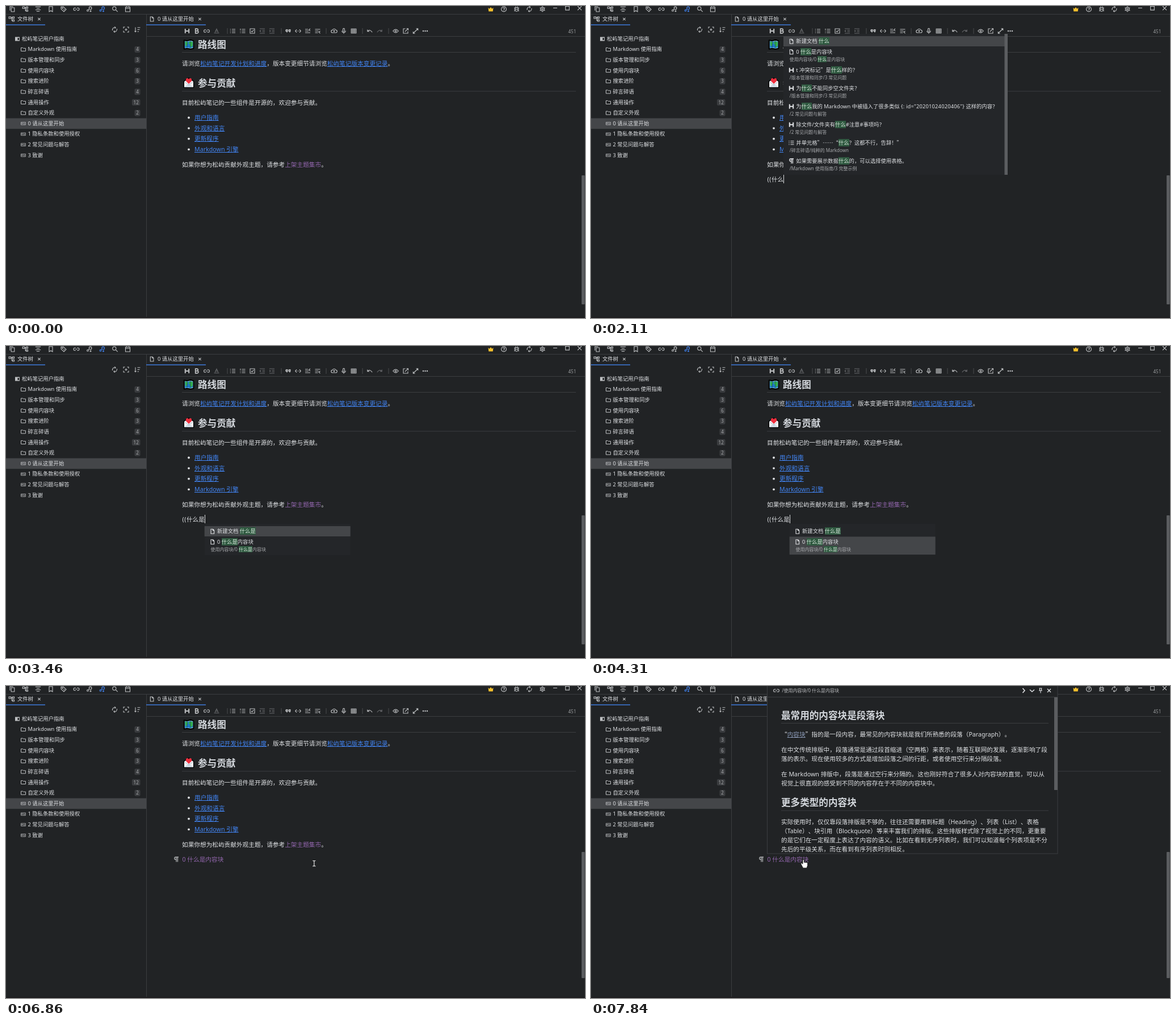
Recreate the animation shown at these times as an HTML page. Size 1020 by 549 pixels, loop 8 s.

```html
<!DOCTYPE html>
<html lang="zh-CN">
<head>
<meta charset="utf-8">
<title>内容块引用</title>
<style>
html, body { margin: 0; width: 100%; height: 100%; overflow: hidden; background: #212325; }
body, div, svg.layer { position: absolute; left: 0; top: 0; width: 1020px; height: 549px; overflow: hidden; }
body { font-family: "Noto Sans", "Noto Sans CJK SC", "Noto Sans CJK", sans-serif; text-spacing-trim: space-all; }
p { position: absolute; margin: 0; line-height: 20px; white-space: pre; }
p.block { line-height: 16px; }
i { font-style: normal; font-family: "Noto Sans CJK SC", "Noto Sans CJK", sans-serif; line-height: 0; }
u { color: #4285f4; }
mark { background: #2f5940; color: #dbeade; }
s { position: absolute; top: 2px; width: 1px; height: 15px; background: #dcdee0; }
.paren { letter-spacing: .5px; }
.code { letter-spacing: .18px; }
.bulb { width: 1em; height: 1.15em; vertical-align: -.2em; }
</style>
</head>
<body>
<div id="base"></div>
<div id="live"></div>
<script>
const BG = "#212325", MENU = "#242629", LINE = "#3b3d40", SELECTED = "#444649", THUMB = "#5b5d60";
const TEXT = "#dfe1e4", ICON = "#bfc1c3", DIM = "#696b6e", BLUE = "#4285f4", PURPLE = "#9266ad", ORANGE = "#ffc567";
const SMALL = 8, UI = 9.33, BODY = 10.67, HEAD = 16.6;
const DURATION = 8000;

const ring = (x, y, r) => `M${x - r} ${y}a${r} ${r} 0 1 0 ${2 * r} 0a${r} ${r} 0 1 0 ${-2 * r} 0`;
const lines = (...ys) => ys.map(y => `M-1.5 ${y}h6M-4.7 ${y}h1.3`).join("");
const nodes = ring(1.6, -1.8, 2.3) + ring(-3, 2.4, 1.4) + ring(2, 3.5, .9) + "M-2 1.4l1.9-1.7";
const sync = "M-3.8 1.5a4 4 0 0 1 5.2-5M-.2-5l1.8 1.5-1.5 1.6M3.8-1.5a4 4 0 0 1-5.2 5M.2 5l-1.8-1.5 1.5-1.6";
const ICONS = {
  copy: "M-1.8-2.5h5.6v7h-5.6zM-4 2.5v-7h5.5",
  tree: "M-4.8-4h3.5v3h-3.5zM1.5-4h3v2.6h-3zM1.5 1.4h3V4h-3zM-1.3-2.7h2.8M.2-2.7v5.4h1.3",
  outline: "M-4.7-4h9.4M-2.7-1.3h5.4M-4.7 1.3h9.4M-2.7 4h5.4",
  bookmark: "M-3-4.5h6v9l-3-1.8-3 1.8z",
  tag: "M-4.5-4h4.3l4.7 4.5-4 4-5-4.7z" + ring(-2, -1.8, .7) + "M0 0l1.5 1.5",
  link: "M-1-2.3h-1.6a2.3 2.3 0 0 0 0 4.6h1.6M1-2.3h1.6a2.3 2.3 0 0 1 0 4.6H1M-1.7 0h3.4",
  nodes,
  search: ring(-1.2, -1.2, 3.1) + "M1.2 1.2l3.5 3.5",
  calendar: "M-4-3.5h8v8h-8zM-4-1.3h8M-2-5v2M2-5v2",
  help: ring(0, 0, 4.5) + "M-1.5-1a1.5 1.5 0 1 1 2.2 1.3Q0 .6 0 1.4M0 2.2v1",
  bug: "M-2.5-2.5h5v5q-2.5 3-5 0zM-4.5-2h2M2.5-2h2M-4.5 .5h9M-4.5 3h2M2.5 3h2M-2-4.5l1 1.5M2-4.5l-1 1.5",
  sync,
  gear: ring(0, 0, 3.4) + ring(0, 0, 1.3) + "M0-5v1.5M0 3.5V5M-4.5-2.5l1.3.8M3.2 1.7l1.3.8M4.5-2.5l-1.3.8M-3.2 1.7l-1.3.8",
  minimise: "M-3.5-2h7", maximise: "M-3.3-5h6.6v6.6h-6.6z", close: "M-3.5-5.2l7 7M3.5-5.2l-7 7", cross: "M-2.2-2.2l4.4 4.4M2.2-2.2l-4.4 4.4",
  focus: "M-4.5-2v-2.5H-2M2-4.5h2.5V-2M4.5 2v2.5H2M-2 4.5h-2.5V2" + ring(0, 0, 1.3),
  sort: "M-3.5-4v8M-5 2.5l1.5 1.7L-2 2.5M0-3.5h5M0 0h4M0 3.5h2.5",
  folder: "M-4-3h3l1 1h4v5h-8z",
  markdown: "M-4-2.3h8v4.6h-8zM-2.6 1v-2l1 1 1-1v2M1.8-1v2M.8 .2l1 .9 1-.9",
  doc: "M-2.7-4h3.6l2 2v6h-5.6zM.7-4v2.2h2.2",
  H: "M-3.2-4v8M3.2-4v8M-3.2 0h6.4", B: "M-2.3-3.8h2.7a1.8 1.8 0 0 1 0 3.7h-2.7zM-2.3-.1h3.2a1.9 1.9 0 0 1 0 3.9h-3.2z",
  A: "M-2.8 2.2l2.8-6 2.8 6M-1.8 .2h3.6",
  list: lines(-3, 0, 3), ordered: lines(-3, 0, 3) + "M-4-4v2",
  check: "M-4-4h8v8h-8zM-2 0l1.5 1.6L2.5-2",
  outdent: "M-4.5-4h9M0-1.3h4.5M0 1.3h4.5M-4.5 4h9M-2.5-1.5L-4.3 0l1.8 1.5",
  indent: "M-4.5-4h9M0-1.3h4.5M0 1.3h4.5M-4.5 4h9M-4.3-1.5L-2.5 0l-1.8 1.5",
  quote: "M-3.8-2.2h2.5v2.5l-1.3 2M-3.8-2.2v2.5h2.5M1.2-2.2h2.5v2.5l-1.3 2M1.2-2.2v2.5h2.5",
  code: "M-2.4-2.5L-4.8 0l2.4 2.5M2.4-2.5L4.8 0 2.4 2.5M-.9 0h1.8",
  before: "M-4.5-3h5M-4.5 0h6M-4.5 3h9M4.5-4L2-2l2.5 2", after: "M-4.5-3h9M-4.5 0h6M-4.5 3h5M4.5 0L2 2l2.5 2",
  upload: "M-2.7 3a2.3 2.3 0 0 1-.3-4.6 3.3 3.3 0 0 1 6.2 0A2.3 2.3 0 0 1 2.8 3zM0 2v-3M-1.3 .2L0-1.2 1.3 .2",
  mic: "M-1.4-3.2a1.4 1.4 0 0 1 2.8 0v3a1.4 1.4 0 0 1-2.8 0zM-3.2-.5a3.2 3.2 0 0 0 6.4 0M0 2.7v2",
  table: "M-4.3-3.7h8.6v7.4h-8.6zM-4.3-1.3h8.6M-4.3 1.2h8.6M-1.4-3.7v7.4M1.4-3.7v7.4",
  undo: "M-4.2-2.5v3.2h3.2M-4 .5q4-4.5 8.2 1.8", redo: "M4.2-2.5v3.2H1M4 .5q-4-4.5-8.2 1.8",
  eye: "M-4.8 0q4.8-6 9.6 0q-4.8 6-9.6 0z" + ring(0, 0, 1.3),
  exportOut: "M-.5-4h-3.5v8h8V.5M1.5-4.3h3v3M4.3-4.2L-1 1",
  expand: "M1-4.2h3.2V-1M-1 4.2h-3.2V1M4-4l-8 8",
  more: ring(-3.5, 0, .7) + ring(0, 0, .7) + ring(3.5, 0, .7),
  pilcrow: "M4-4h-5a2.2 2.2 0 0 0 0 4.4h1M0-4v8.4M2.4-4v8.4",
  right: "M-1.5-4l3.5 4-3.5 4", down: "M-4-1.5l4 3.5 4-3.5", pin: "M-2.5-4h5M-1.5-4v4M1.5-4v4M-3 0h6M0 0v4.5"
};
const WEIGHTS = { H: 2, B: 1.7, right: 1.6, down: 1.6, pilcrow: 1.4, quote: 1.5, markdown: .8, folder: 1 };

const svg = markup => `<svg class="layer">${markup}</svg>`;
const rect = (x, y, w, h, fill, extra = "") => `<rect x="${x}" y="${y}" width="${w}" height="${h}" fill="${fill}" ${extra}/>`;
const shape = (d, fill, extra = "") => `<path d="${d}" fill="${fill}" ${extra}/>`;
const at = (x, y, markup) => `<g transform="translate(${x} ${y})">${markup}</g>`;
const icon = (name, x, y, color = ICON) =>
  at(x, y, shape(ICONS[name], "none", `stroke="${color}" stroke-width="${WEIGHTS[name] || 1.1}"`));
const iconRow = (y, names, xs, color) => names.split(" ").map((name, i) => icon(name, xs[i], y, color)).join("");
// Curly quotes and ellipses are full width, as in Chinese type.
const wide = html => html.replace(/[“”…]+/g, "<i>$&</i>");
const text = (x, y, size, html, color = TEXT, style = "") =>
  `<p style="left:${x}px;top:${y - 10}px;font-size:${size}px;color:${color};${style}">${wide(html)}</p>`;
const heading = (x, y, html) => text(x, y, HEAD, html, "#d3d7dc", "font-weight:700");
const paragraph = (x, y, rows) =>
  `<p class="block" style="left:${x}px;top:${y - 8}px;font-size:${BODY}px;color:${TEXT}">${wide(rows.join("<br>"))}</p>`;

const MAP = shape("M-8.2-7.2l5.2 1 6-1.5 5.4 1.5v13.4l-5.4 1-6-1-5.2 1z", "#a5e3f2", 'stroke="#000" stroke-width="2" stroke-linejoin="round"') +
  shape("M-6.8-5.4l4.3 1 5-1.3 4.6 1v10.3l-4.6 1-5-1-4.3 1z", "#1f78c4") +
  shape("M-6.5-5l4 .8 1.5 2-2 2.5-1 4-2-3zM1-5.2l5.8 1v6l-2.8 4-2-5-2-2z", "#35b24a") +
  shape("M-2.7-6v12M2.8-6.5v12.5", "none", 'stroke="#123f68" stroke-width=".7"');
const LETTER = shape("M-8.5-2.5L0-8.3l8.5 5.8v10.8h-17z", "#000", 'stroke="#000" stroke-width="1.6" stroke-linejoin="round"') +
  shape("M-8-2.2L-4-4.5h8l4 2.3v10h-16z", "#f2f4f6") +
  shape("M-8 7.8l8-6 8 6z", "#cfdbe6") +
  shape("M-8-2L0 4l8-6", "none", 'stroke="#9fb0bf" stroke-width=".8"') +
  shape("M0 2l-5-5q-1-4.6 2.4-5Q-.6-8 0-6q.6-2 2.6-2 3.4.4 2.4 5z", "#ee2f3e");
const BULB = `<svg class="bulb" viewBox="-5 -6 10 12"><circle cy="-2" r="3.7" fill="#ffcd38"/><path d="M-1.6 1.3h3.2v3.6h-3.2z" fill="#b6a77a"/></svg>`;

function sidebar() {
  const folders = [["Markdown 使用指南", 4], ["版本管理和同步", 3], ["使用内容块", 6], ["搜索进阶", 3], ["碎言碎语", 4], ["通用操作", 12], ["自定义外观", 2]];
  const pages = ["0 请从这里开始", "1 隐私条款和使用授权", "2 常见问题与解答", "3 致谢"];
  let shapes = rect(0, 197.5, 247, 18.7, SELECTED), words = text(28, 58, UI, "松屿笔记用户指南");
  [...folders, ...pages].forEach((entry, i) => {
    const y = 76.4 + i * 18.63, [name, count] = Array.isArray(entry) ? entry : [entry];
    shapes += icon(count ? "folder" : "markdown", 30.5, y);
    words += text(38.5, y, UI, name);
    if (count) {
      const w = count > 9 ? 14.6 : 10;
      shapes += rect(236.5 - w, y - 5.5, w, 11, "#3a3c3f", 'rx="2"');
      words += text(239.2 - w, y, SMALL, String(count), "#a5a7a9");
    }
  });
  shapes += shape("M16 54.5h8v7h-8z", ICON) + shape("M20.5 56h2.5v4h-2.5z", BG);
  return svg(shapes) + words;
}

function chrome() {
  const separators = [389.5, 484.5, 563.5, 627.5, 673.5].map(x => rect(x, 39, 1, 10, "#4a4c4f")).join("");
  return svg(
    rect(0, 14, 1020, 1, LINE) + rect(247, 14, 1, 533, LINE) + rect(248, 53, 772, 1, LINE) + rect(0, 547, 1020, 2, "#1c1b1d") +
    rect(0, 32.5, 69, 1.3, BLUE) + rect(247, 32.5, 105, 1.3, BLUE) +
    iconRow(5.5, "copy tree outline bookmark tag link nodes", [11, 34, 56.5, 79, 101.5, 124, 147]) +
    icon("nodes", 169.5, 5.5, BLUE) + iconRow(5.5, "search calendar", [192, 214.5]) +
    at(854, 6, shape("M-4.5-3l2.3 2L0-4l2.2 3 2.3-2-.8 6.5h-7.4z", "#f6c12d")) +
    iconRow(5.5, "help bug sync gear minimise maximise close", [877, 899.5, 922, 945, 967.5, 989, 1010.5]) +
    iconRow(23, "tree cross doc cross", [10, 58.5, 257, 341.5]) +
    iconRow(41.5, "sync focus sort", [191.5, 211.5, 231.5]) +
    iconRow(44, "H B link list ordered check quote code before after upload mic table undo eye exportOut expand more",
      [319, 336, 353.5, 399.5, 417, 434, 497, 514.5, 531.5, 549, 578, 595, 612.5, 641, 686.5, 704, 721.5, 738.5]) +
    iconRow(44, "outdent indent redo", [451.5, 468.5, 658], DIM) + separators
  ) + text(20, 23, UI, "文件树") + text(267, 23, UI, "0 请从这里开始") + text(990.5, 44.5, SMALL, "451", "#999b9d");
}

function article() {
  const links = ["用户指南", "外观和语言", "更新程序", "Markdown 引擎"];
  return svg(
    at(322, 67.5, MAP) + at(322, 135, LETTER) + rect(310, 81, 694, 1, LINE) + rect(310, 149.5, 694, 1, LINE) +
    links.map((_, i) => `<circle cx="322" cy="${196.5 + i * 18.6}" r="1.9" fill="${TEXT}"/>`).join("")
  ) + heading(338, 67.5, "路线图") + heading(338, 135.5, "参与贡献") +
    text(310, 101, BODY, "请浏览<u>松屿笔记开发计划和进度</u>，版本变更细节请浏览<u>松屿笔记版本变更记录</u>。") +
    text(310, 169.5, BODY, "目前松屿笔记的一些组件是开源的，欢迎参与贡献。") +
    links.map((name, i) => text(332, 196 + i * 18.6, BODY, `<u>${name}</u>`)).join("") +
    text(310, 279, BODY, `如果你想为松屿贡献外观主题，请参考<span style="color:${PURPLE}">上架主题集市</span>。`);
}

function menu({ x, y, w, h, bar = 0, items }, selected = 0) {
  let shapes = rect(x, y, w, h, MENU), words = "", top = y + 4;
  items.forEach(([kind, title, path], i) => {
    const rowHeight = path ? 32 : 18.5;
    if (i === selected) shapes += rect(x, top, w, rowHeight - .5, SELECTED);
    shapes += icon(kind, x + 14, top + 9.3, TEXT);
    words += text(x + 22.3, top + 9.3, UI, title);
    if (path) words += text(x + 10.7, top + 22.3, SMALL, path, "#a8aaad");
    top += rowHeight;
  });
  if (bar) shapes += rect(x + w - 5.5, y, 5.5, bar, THUMB);
  return `<div style="clip-path:inset(0 0 ${549 - y - h}px 0)">${svg(shapes)}${words}</div>`;
}
const hit = "<mark>什么</mark>";
const recentMenu = menu({ x: 318, y: 49, w: 256, h: 248, bar: 60, items: [
  ["doc", "抽象泄露和奥康的剃刀", "/碎言碎语/抽象泄露和奥康的剃刀"],
  ["doc", "0 什么是内容块", "/使用内容块/0 什么是内容块"],
  ["doc", BULB + " 缘起", `/碎言碎语/${BULB} 缘起`],
  ["doc", "纯粹的 Markdown", "/碎言碎语/纯粹的 Markdown"],
  ["doc", "1 本地仓库", "/版本管理和同步/1 本地仓库"],
  ["doc", "1 隐私条款和使用授权", "/1 隐私条款和使用授权"],
  ["doc", "2 云端同步", "/版本管理和同步/2 云端同步"],
  ["doc", "0 语法速查手册", "/Markdown 使用指南/0 语法速查手册"]] });
const searchMenu = menu({ x: 339, y: 49, w: 395, h: 248, bar: 248, items: [
  ["doc", `新建文档 ${hit}`],
  ["doc", `0 ${hit}是内容块`, `使用内容块/0 ${hit}是内容块`],
  ["H", `t 冲突标记”是${hit}样的？`, "/版本管理和同步/3 常见问题"],
  ["H", `为${hit}不能同步空文件夹？`, "/版本管理和同步/3 常见问题"],
  ["H", `为${hit}我的 Markdown 中被插入了很多类似 <span class="code">{: id="20201024020406"}</span> 这样的内容？`, "/2 常见问题与解答"],
  ["H", `除文件/文件夹有${hit}#注意#事项吗？`, "/2 常见问题与解答"],
  ["list", `并单元格”……“${hit}？这都不行，告辞！”`, "/碎言碎语/纯粹的 Markdown"],
  ["pilcrow", `如果需要展示数据${hit}的，可以选择使用表格。`, "/Markdown 使用指南/3 完整示例"]] });
const fullHit = "<mark>什么是</mark>";
const finalMenu = selected => menu({ x: 349.7, y: 313, w: 257, h: 55, items: [
  ["doc", `新建文档 ${fullHit}`],
  ["doc", `0 ${fullHit}内容块`, `使用内容块/0 ${fullHit}内容块`]] }, selected);

function candidates(x, words) {
  let left = x + 10, html = "";
  words.split(" ").forEach((word, i) => {
    html += text(left, 326, BODY, `${i + 1}.${word}`, i ? "#555" : "#2f8fe6", "font-weight:300");
    left += 17.3 + BODY * word.length;
  });
  const w = left - x + 20;
  return svg(rect(x + .5, 314.5, w - 1, 23, "#fdfdfd", 'stroke="#8db4cf"') +
    shape(`M${left + 2} 323.5v5l-3-2.5z`, "#c3c7cb") + shape(`M${left + 8} 323v6l3.5-3z`, "#2f8fe6")) + html;
}

const preview = svg(
  rect(310.5, -2, 511.5, 297, BG, `stroke="${LINE}"`) + rect(311, 19, 511, 1, LINE) +
  rect(335, 65, 471, 1, LINE) + rect(335, 218.7, 471, 1, LINE) + rect(816, 20, 6, 163, THUMB) +
  icon("link", 326.5, 8) + iconRow(8, "right down pin", [762, 777, 792], TEXT) +
  at(807, 8, shape("M-3-3l6 6M3-3l-6 6", "none", `stroke="${TEXT}" stroke-width="1.4"`))
) + text(336.5, 8, SMALL, "/使用内容块/0 什么是内容块", "#b9bbbe") +
  heading(335, 52, "最常用的内容块是段落块") + heading(335, 205, "更多类型的内容块") +
  paragraph(335, 85, ['“<u style="color:#8c9bb8">内容块</u>”指的是一段内容，最常见的内容块就是我们所熟悉的段落（Paragraph）。']) +
  paragraph(335, 112, ["在中文传统排版中，段落通常是通过段首缩进（空两格）来表示，随着互联网的发展，逐渐影响了段",
    "落的表示。现在使用较多的方式是增加段落之间的行距，或者使用空行来分隔段落。"]) +
  paragraph(335, 154.5, ["在 Markdown 排版中，段落是通过空行来分隔的。这也刚好符合了很多人对内容块的直觉，可以从",
    "视觉上很直观的感受到不同的内容存在于不同的内容块中。"]) +
  paragraph(335, 239, ["实际使用时，仅仅靠段落排版是不够的，往往还需要用到标题（Heading）、列表（List）、表格",
    "（Table）、块引用（Blockquote）等来丰富我们的排版。这些排版样式除了视觉上的不同，更重要",
    "的是它们在一定程度上表达了内容的语义。比如在看到无序列表时，我们可以知道每个列表项是不分",
    "先后的平级关系，而在看到有序列表时则相反。"]);

// Start time, typed text after the brackets, input method candidates.
const TYPING = [
  [710, ""], [1160, "s", "是 上 时候 说 三"], [1270, "sh", "是 上 时候 说 事"], [1390, "she", "社 设 射 蛇 舍"],
  [1500, "shen", "慎 深 神 身 参"], [1710, "shen'm", "什么 神秘 生命 声明 甚"], [1780, "shen'me", "什么 甚么 神么 深 什"],
  [1850, "什么"], [2420, "什么s"], [2480, "什么s", "是 上 说 时 三"], [2630, "什么sh", "是 上 时候 说 事"],
  [2690, "什么shi", "是 事 时 十 使"], [3220, "什么是"]
];
const within = (t, from, to) => t >= from && t < to;
const caret = (opacity = 1) => `<s style="opacity:${opacity}"></s>`;
const OPEN = '<span class="paren">((</span>';

function editorLine(t) {
  const line = html => text(310.5, 305, BODY, html);
  if (t < 500) return "";
  if (t < 710) return line("(" + caret());
  if (t < 4580) {
    const [, typed, words] = TYPING.filter(([start]) => t >= start).pop();
    const blink = within(t, 3770, 3820) ? .5 : within(t, 3820, 4310) ? 0 : 1;
    return line(OPEN + typed + caret(blink)) + (words ? candidates(typed.startsWith("什么") ? 340 : 319, words) : "");
  }
  if (t < 5780) {
    const selection = t < 5230 ? "#2d4f78" : "none";
    const brackets = s => `<span class="paren" style="color:#5d7d5c">${s}</span>`;
    return line(`${brackets("((")}<span style="color:${ORANGE}"><span class="code">20200813004931-q4cu8na</span> ` +
      `"<span style="color:${PURPLE};background:${selection}">{{.text}}</span>"</span>${brackets("))")}` + (t < 5230 ? "" : caret()));
  }
  const blink = t < 6310 || within(t, 6900, 7660) ? 1 : t < 6370 ? .5 : 0;
  return text(310.5, 305, BODY, "0 什么是内容块", PURPLE) + text(310.5, 331, BODY, caret(blink));
}

function pointer(t) {
  if (t < 6520) return "";
  const left = 1 - Math.min(19, Math.floor((t - 6520) / 42.1)) / 19;
  const x = 375 + 603 * left ** 2.34, y = 311.5 + 18 * left ** 6;
  const hand = shape("M-2-5.3v7l-1.8-1.6q-2-.2-1.4 1.4l3.7 7.2h6.6l1.5-4.5v-4.6q-.9-1.1-1.9-.2-.9-1.1-2.3-.2-.8-.9-2-.3v-4.2q-1.2-1.3-2.4 0z", "#fff", 'stroke="#111" stroke-width=".8"');
  const beam = shape("M-2.5-4.7h1.6L0-4l.9-.7h1.6M0-4v8M-2.5 4.7h1.6L0 4l.9.7h1.6", "none", 'stroke="#f2f2f2" stroke-width="1.1"');
  return svg((t >= 6600 ? icon("pilcrow", 300, 305, "#a9abad") : "") + at(x, y, x < 383 ? hand : beam));
}

function scene(t) {
  const colorIcon = within(t, 4890, 5540) ? ICON : DIM;
  const thumb = t < 5780 ? [298, 227] : [292, 222];
  let html = svg(icon("A", 371, 44, colorIcon) + rect(366.5, 47, 9, 1, DIM) + rect(1014, thumb[0], 5.5, thumb[1], THUMB, 'rx="1"'));
  html += editorLine(t);
  if (within(t, 920, 2110)) html += recentMenu;
  if (within(t, 2110, 3460)) html += searchMenu;
  if (within(t, 3460, 4580)) html += finalMenu(t < 4130 ? 0 : 1);
  if (t >= 7660) {
    const opacity = Math.min(1, (Math.floor((t - 7660) / 45) + 1) / 5);
    html += `<div style="opacity:${opacity}">${preview}</div>`;
  }
  return html + pointer(t);
}

document.getElementById("base").innerHTML = chrome() + sidebar() + article();
const live = document.getElementById("live");
const start = performance.now();
let shown = "";
function draw() {
  const html = scene((performance.now() - start) % DURATION);
  if (html !== shown) live.innerHTML = shown = html;
  requestAnimationFrame(draw);
}
draw();
</script>
</body>
</html>
```
